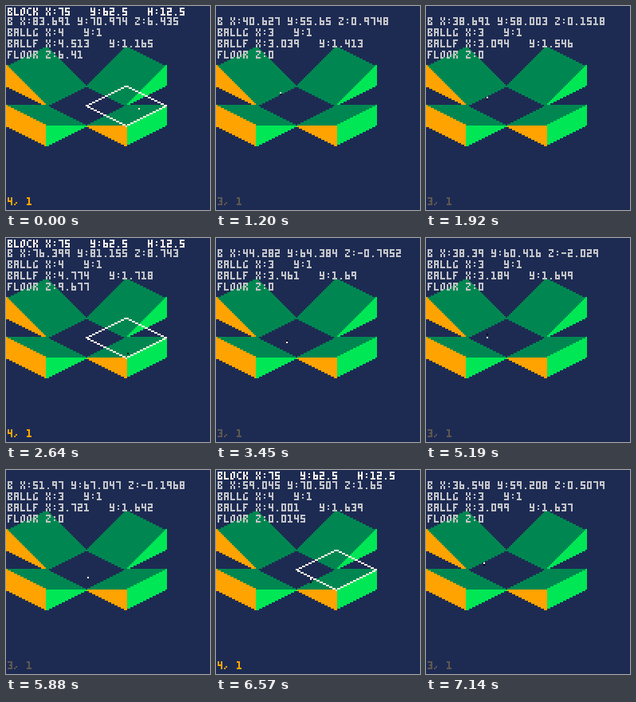
These frames come from a looping animation (256x256 px, 7170 ms). An HTML page with a canvas:

```html
<!DOCTYPE html>
<html lang="en">
<head>
<meta charset="utf-8">
<title>Ball on slopes</title>
<style>
html, body { margin: 0; width: 100%; height: 100%; overflow: hidden; background: #1d2b53; }
canvas { display: block; width: 256px; height: 256px; image-rendering: pixelated; }
</style>
</head>
<body>
<canvas id="view" width="128" height="128" role="img" aria-label="Ball rolling between sloped blocks, with position readout"></canvas>
<script>
const LOOP = 7170, STEP = 30, HEIGHT = 12.5;
const NAVY = '#1d2b53', TOP = '#008751', RIGHT = '#00e756', LEFT = '#ffa300';
const WHITE = '#fff1e8', GREY = '#c2c3c7', DIM = '#5f574f', BLACK = '#000';
const ctx = document.getElementById('view').getContext('2d');

// Letters are strokes between cells a..o, read row by row on a 3 by 5 grid
const GLYPHS = {
  0: 'am co ac mo', 1: 'ab bn mo', 2: 'ac ci gi gm mo', 3: 'ac co hh mo',
  4: 'ag gi co', 5: 'ac ag gi io mo', 6: 'am gi io mo', 7: 'ac co',
  8: 'am co ac gi mo', 9: 'ac ag gi co',
  A: 'am co ac gi', B: 'ac am cf gh lo mo', C: 'bc dj no', F: 'ac am gh',
  G: 'bc dj lo mo', H: 'am co gi', K: 'am cf gh lo', L: 'am mo',
  O: 'bc dm mn cl', R: 'ac am cf gh lo', X: 'ad cf hh jm lo', Y: 'ag gi co mo',
  Z: 'ac ff hh jj mo', '-': 'gi', ':': 'ee kk', '.': 'nn', ',': 'kk mm'
};

// Each block rises away from the pit; rise(u, v) is 0..1 across the tile
const BLOCKS = [
  { col: 3, row: 0, rise: (u, v) => 1 - v },
  { col: 2, row: 1, rise: u => 1 - u },
  { col: 4, row: 1, rise: u => u },
  { col: 3, row: 2, rise: (u, v) => v }
];

const project = (col, row, z) => [(col - row) * 25, (col + row) * 12.5 - z];

function surface(x, y) {
  const fx = x / 50 + y / 25, fy = y / 25 - x / 50;
  const col = Math.floor(fx), row = Math.floor(fy);
  const block = BLOCKS.find(b => b.col === col && b.row === row);
  const floor = block ? block.rise(fx - col, fy - row) * HEIGHT : 0;
  return { fx, fy, col, row, block, floor };
}

// Turning and passing points of the ball: time, x, y, height above the surface
const PATH = [
  [0, 83.691, 70.974, 6.435],
  [1200, 40.627, 55.65, 0.9748],
  [1620, 28.75, 51.9, 5],
  [2640, 76.399, 81.155, 8.743],
  [4230, 13.933, 48.536, 9.085],
  [5190, 38.39, 60.416, -2.029],
  [6570, 59.0448, 70.5066, 1.65],
  [7140, 36.548, 59.208, 0.5079]
].map(([t, x, y, z]) => [t, x, y, z - surface(x, y).floor]);

// Monotone cubic through the path points
function slope(i, axis) {
  const rate = k => (PATH[k + 1][axis] - PATH[k][axis]) / (PATH[k + 1][0] - PATH[k][0]);
  if (i === 0) return rate(0);
  if (i === PATH.length - 1) return rate(i - 1);
  const a = rate(i - 1), b = rate(i);
  return a * b <= 0 ? 0 : 2 * a * b / (a + b);
}

function ballAt(t, axis) {
  let i = 0;
  while (i < PATH.length - 2 && t >= PATH[i + 1][0]) i++;
  const p = PATH[i], q = PATH[i + 1], span = q[0] - p[0];
  const s = (t - p[0]) / span, r = 1 - s;
  return r * r * (1 + 2 * s) * p[axis] + s * s * (3 - 2 * s) * q[axis]
    + span * s * r * (r * slope(i, axis) - s * slope(i + 1, axis));
}

function plot(x, y, color, w = 1, h = 1) {
  ctx.fillStyle = color;
  ctx.fillRect(Math.floor(x), Math.floor(y), w, h);
}

// Scans down from the exact top corner, so half-pixel corners keep their slope
function fillTriangle(points, color) {
  const ys = points.map(p => p[1]);
  for (let y = Math.min(...ys); y <= Math.max(...ys); y++) {
    const xs = [];
    points.forEach(([x0, y0], i) => {
      const [x1, y1] = points[(i + 1) % 3];
      if (y < Math.min(y0, y1) || y > Math.max(y0, y1)) return;
      if (y0 === y1) xs.push(x0, x1);
      else xs.push(x0 + (x1 - x0) * (y - y0) / (y1 - y0));
    });
    const from = Math.floor(Math.min(...xs));
    plot(from, y, color, Math.floor(Math.max(...xs)) - from + 1);
  }
}

function fillQuad([a, b, c, d], color) {
  fillTriangle([a, b, c], color);
  fillTriangle([a, c, d], color);
}

function line([x0, y0], [x1, y1], color) {
  const n = Math.abs(x1 - x0);
  for (let i = 0; i <= n; i++) {
    plot(x0 + (x1 - x0) * i / n, Math.round(y0 + (y1 - y0) * i / n), color);
  }
}

function print(text, y, color) {
  const cell = letter => letter.charCodeAt(0) - 97;
  [...text].forEach((ch, i) => {
    if (ch === ' ') return;
    for (const [from, to] of GLYPHS[ch].split(' ')) {
      const p = cell(from), q = cell(to);
      const px = p % 3, py = Math.floor(p / 3);
      plot(1 + i * 4 + px, y + py, color, q % 3 - px + 1, Math.floor(q / 3) - py + 1);
    }
  });
}

function drawBlock({ col, row, rise }) {
  const at = (u, v, z = rise(u, v) * HEIGHT) => project(col + u, row + v, z);
  fillQuad([at(0, 0), at(1, 0), at(1, 1), at(0, 1)], TOP);
  const walls = [
    { size: rise(0, 1) + rise(1, 1), color: LEFT, quad: [at(1, 1), at(1, 1, 0), at(0, 1, 0), at(0, 1)] },
    { size: rise(1, 0) + rise(1, 1), color: RIGHT, quad: [at(1, 0), at(1, 1), at(1, 1, 0), at(1, 0, 0)] }
  ];
  // The narrower wall covers the shared corner
  walls.filter(w => w.size > 0)
    .sort((a, b) => b.size - a.size)
    .forEach(w => fillQuad(w.quad, w.color));
}

function drawOutline({ col, row }) {
  const ring = [[0, 0], [1, 0], [1, 1], [0, 1]]
    .map(([u, v]) => project(col + u, row + v, HEIGHT).map(Math.floor));
  ring.forEach((p, i) => line(p, ring[(i + 1) % 4], WHITE));
}

const show = n => String(+n.toFixed(Math.abs(n) < 1 ? 4 : 3));

function draw(t) {
  const [x, y, lift] = [1, 2, 3].map(axis => ballAt(t, axis));
  const { fx, fy, col, row, block, floor } = surface(x, y);
  const z = floor + lift;
  const sunk = block && lift < 0;

  plot(0, 0, NAVY, 128, 128);
  BLOCKS.forEach(drawBlock);
  if (block) {
    drawOutline(block);
    const [midX, midY] = project(col + 0.5, row + 0.5, HEIGHT);
    print(`BLOCK X:${midX}   Y:${midY}   H:${HEIGHT}`, 1, WHITE);
  }
  if (!sunk) plot(x, y - floor, BLACK);
  plot(x, y - z, sunk ? BLACK : WHITE);
  print(`B X:${show(x)} Y:${show(y)} Z:${show(z)}`, 7, GREY);
  print(`BALLG X:${col}   Y:${row}`, 14, GREY);
  print(`BALLF X:${show(fx)}   Y:${show(fy)}`, 21, GREY);
  print(`FLOOR Z:${show(floor)}`, 28, GREY);
  print(`${col}, ${row}`, 120, block ? LEFT : DIM);
}

const start = performance.now();
function tick() {
  const t = (performance.now() - start) % LOOP;
  draw(Math.floor(t / STEP) * STEP);
  requestAnimationFrame(tick);
}
tick();
</script>
</body>
</html>
```
